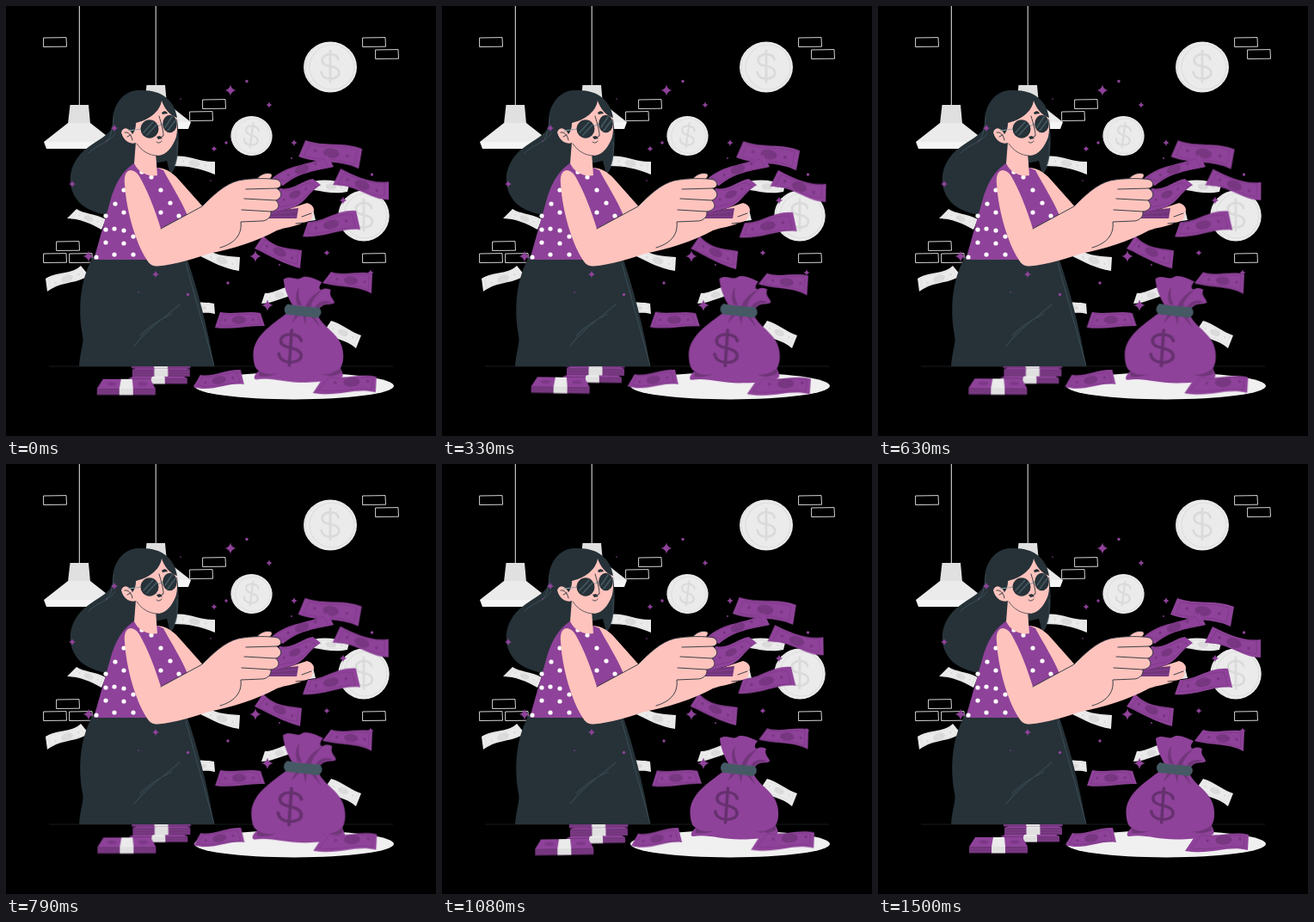
Write an HTML page that moves like this. It is 500 px wide and 500 px high and loops after 1.54 s.

```html
<!DOCTYPE html>
<html lang="en">
<head>
<meta charset="utf-8">
<title>Money shower</title>
<style>
  html, body { margin: 0; width: 100%; height: 100%; overflow: hidden; background: #000; }
  svg { display: block; width: 100vw; height: 100vh; }
  .line { fill: none; stroke-linecap: round; stroke-linejoin: round; }
  .ink { stroke: #263238; stroke-width: .9; }
  .dark { fill: #263238; }
  .skin { fill: #ffc3bd; }
  .plum { fill: #8e4299; }
  .deep { fill: #71357a; }
  .pale { fill: #ebebeb; }
  .grey { fill: #e0e0e0; }
  .wind { transform-origin: 276px 304px; animation: wind 1.54s linear infinite; }
  .beat { transform-origin: 340px 376px; animation: beat 1.54s linear infinite; }
  @keyframes wind {
    0% { transform: rotate(.08deg); }
    22.9% { transform: rotate(1deg); }
    72.6% { transform: rotate(-1deg); }
    97.4%, 100% { transform: rotate(0deg); }
  }
  @keyframes beat {
    0% { transform: scale(1.02); }
    8% { transform: scale(1.1); }
    27.8%, 37.8% { transform: scale(1); }
    47.7% { transform: scale(1.1); }
    57.7%, 100% { transform: scale(1); }
  }
</style>
</head>
<body>
<svg viewBox="0 0 500 500" xmlns="http://www.w3.org/2000/svg">
  <defs>
    <path id="dollar" class="line" d="M11 -9C10 -14 5 -16 0 -16C-6 -16 -11 -13 -11 -8C-11 -2 -5 -1 0 0C6 1 12 3 12 9C12 14 6 17 0 17C-6 17 -11 14 -12 8M0 -21V21"/>
    <g id="lamp">
      <path class="grey" d="M-10.500 0H11L13 22H-13Z"/>
      <path class="pale" d="M-13 21H13L41 43H-41Z"/>
      <path fill="#f5f5f5" d="M-41 43H41L38 51H-38Z"/>
    </g>
    <g id="coin">
      <ellipse class="pale" rx="31" ry="29.500"/>
      <ellipse class="line" cx="2" rx="26" ry="26" stroke="#dedede" stroke-width="1.200"/>
      <path class="line" d="M-15 -24C-34 -12 -34 12 -15 24" stroke="#dedede"/>
      <use href="#dollar" transform="translate(0 -1) scale(.86)" stroke="#dadada" stroke-width="3.200"/>
    </g>
  </defs>

  <g id="bricks" class="line" stroke="#ebebeb" stroke-width=".9"></g>
  <path d="M85.300 0V115M174.200 0V92" stroke="#ebebeb"/>
  <use href="#lamp" x="85" y="115"/>
  <use href="#lamp" x="174" y="92"/>
  <use href="#coin" x="377" y="71"/>
  <use href="#coin" transform="translate(285.500 151) rotate(8) scale(.78)"/>
  <use href="#coin" transform="translate(416 244) scale(.96 1)"/>
  <path d="M50 419H450" stroke="#1c2529" stroke-width=".8"/>
  <ellipse cx="335" cy="441.700" rx="116" ry="15.700" fill="#f0f0f0"/>
  <g id="paleNotes"></g>

  <g class="beat">
    <path class="plum" d="M334 350C328 340 324 330 323 319C330 314 337 320 342 318C348 313 358 318 367 322C363 327 363 330 366 331C372 328 374 330 377 331C374 339 381 341 381 346C375 349 370 345 364 352Z"/>
    <path class="deep" d="M339 348C336 340 337 333 341 328C339 337 341 342 344 349ZM348 350C352 340 359 335 367 331C359 339 355 344 354 351ZM359 350C365 343 372 342 378 346C371 346 366 347 363 352Z"/>
    <path class="plum" d="M329 356C308 372 288 384 288.500 406C289 416 291 421 295 423C288 429 289 433 292 433C310 430 325 437 349 436.500C372 436 388 433 390 430C392 427 389 424 388 420C393 412 392 397 386 388C377 375 368 372 362 360Z"/>
    <path class="deep" d="M295 423C303 428 309 428 316 426C308 430 301 430 295 429ZM388 420C380 426 372 428 366 427C374 431 382 429 388 426ZM337 359L332 369L341 360ZM345 360L348 371L349 361ZM354 361L365 374L358 361Z"/>
    <path fill="#455a64" d="M328 347C340 350 352 350 363 351C368 355 366 361 361 363C350 361 338 360 327 359C322 355 324 349 328 347Z"/>
    <use href="#dollar" transform="translate(331 397) rotate(4) scale(1.060 .96)" stroke="#66306f" stroke-width="3.300"/>
  </g>

  <g class="wind">
    <g id="packs"></g>
    <g id="plumNotes"></g>
  </g>

  <!-- hair and body -->
  <path class="dark" d="M156 98C135 97 123 118 124 136C125 151 100 157 85 174C69 194 73 218 88 231C101 241 119 245 132 243L150 188L187 180L191 196C202 180 202 155 199 132Z"/>
  <path class="line" d="M126 128C123 140 125 150 116 158M199 158C200 176 198 188 191 195M127 148C122 158 104 162 96 171" stroke="#455a64" stroke-width=".7"/>
  <path class="dark" d="M101 292H210C223 330 235 376 242 419H85C86 402 91 392 89 383C83 350 87 317 101 292Z"/>
  <path class="line" d="M209 299L242 418" stroke="#455a64" stroke-width=".7"/>
  <path class="line" d="M149 395C164 376 181 365 202 347M156 383C168 371 180 364 193 358" stroke="#37474f" stroke-width="1.200"/>
  <path class="skin" d="M176 188C186 189 193 193 201 202L233 238L210 250Z"/>
  <path class="plum" d="M150 182C138 190 129 201 122 224L102 295H214L212 246C204 226 192 208 183 191L173 187Z"/>
  <g id="dots" fill="#fff"></g>
  <path class="skin" d="M151 158L149 183C154 194 166 199 176 197L174 170Z"/>

  <!-- head -->
  <path class="skin" d="M149 128L178 108L197 122C200 140 200 151 195 159C190 169 183 175 173 174C163 173 155 168 151 159C143 162 135 154 134 147C134 141 143 140 148 146Z"/>
  <path class="line ink" d="M138 147C142 146 146 150 147 156M141 152L145 150"/>
  <path class="line" d="M152 160C158 169 167 174 176 174" stroke="#263238" stroke-width=".7"/>
  <path class="dark" d="M127 145C121 121 133 99 156 98C180 97 196 109 199 130C190 127 184 119 181 110C179 124 164 133 151 136C151 143 149 147 147 149C143 141 136 140 134 147C135 152 139 158 142 160C133 158 128 152 127 145Z"/>
  <path class="line" d="M142 145L158 143M176 140L183 137" stroke="#90a4ae" stroke-width="1.200"/>
  <path class="dark" d="M181 124C184 121 187 122 188 125L182 126Z"/>
  <ellipse class="dark" cx="167" cy="143" rx="10.500" ry="10.700"/>
  <ellipse class="dark" cx="190.500" cy="137" rx="8.300" ry="10.300"/>
  <path class="line" d="M160 147L171 135M164 150L175 138M185 141L193 129M188 145L197 133" stroke="#455a64" stroke-width="1.500"/>
  <path class="line ink" d="M178 128C181 138 183 145 183 151L179 153M175 158C177 160 180 159 181 157"/>
  <path class="dark" d="M175 152L179 151L182 154L177 155Z"/>

  <!-- arms and held money -->
  <path class="skin" d="M234 257L305 244L350 229C358 231 360 238 356 241C359 247 352 251 345 252C335 257 326 257 315 261C291 274 262 283 235 288Z"/>
  <path class="line ink" d="M355 241L344 245M345 252L337 253" stroke-width=".7"/>
  <path class="deep" d="M302 239L340 235L338 247H303Z"/>
  <path class="line" d="M304 242L338 239M304 245H338" stroke="#8e4299" stroke-width=".8"/>
  <g id="heldNotes"></g>
  <path class="skin" d="M291 203C294 196 303 193 308 195C312 199 302 204 296 206Z"/>
  <path class="line ink" d="M291 201C295 196 303 193 308 195"/>
  <path class="skin" d="M138 207C136 190 147 186 155 198C165 215 174 239 180 259L228 233C240 221 254 207 270 203C286 200 305 200 316 202C322 206 320 211 315 212C322 217 321 223 314 226C320 232 316 238 308 239C309 246 303 250 297 250L273 251C275 268 263 278 244 285C222 293 196 301 176 302.500C169 303 166 299 163 294C151 275 140 239 138 207Z"/>
  <path class="line ink" d="M180 259L228 233C240 221 254 207 270 203C286 200 305 200 316 202C322 206 320 211 315 212L279 213M315 212C322 217 321 223 314 226L277 224M314 226C320 232 316 238 308 239L274 237M308 239C309 246 303 250 297 250L273 251C275 268 263 277 249 281"/>

  <g id="sparkles" class="plum"></g>
</svg>
<script>
  const ns = "http://www.w3.org/2000/svg";
  const group = id => document.getElementById(id);

  function add(parent, tag, attrs) {
    const el = document.createElementNS(ns, tag);
    for (const key in attrs) el.setAttribute(key, attrs[key]);
    return parent.appendChild(el);
  }

  // A wavy banknote with an inset frame, a medallion and two spots.
  function note(parent, d, x, y, angle, size, fill, shade) {
    const g = add(parent, "g", {});
    add(g, "path", { d, fill });
    add(g, "path", {
      d, fill: "none", stroke: shade, "stroke-width": .7,
      transform: `translate(${x} ${y}) scale(.84 .74) translate(${-x} ${-y})`
    });
    const mark = add(g, "g", {
      fill: shade, transform: `translate(${x} ${y}) rotate(${angle}) scale(${size})`
    });
    add(mark, "ellipse", { rx: 9.5, ry: 5.5 });
    add(mark, "path", {
      d: "M2 -3C-4 -4 -3 0 0 0S3 4 -2 3", fill: "none", stroke: fill,
      "stroke-width": .5, opacity: .5
    });
    for (const cx of [-19, 19]) add(mark, "circle", { cx, r: 1.8 });
  }

  function notes(id, list, fill, shade) {
    for (const n of list) note(group(id), ...n, fill, shade);
  }

  notes("paleNotes", [
    ["M194 175C211 172 225 182 243 181V196C226 189 213 186 194 186Z", 219, 183, 11, .7],
    ["M82 236C91 242 103 241 116 248L111 260C99 253 85 247 71 247Z", 96, 247, 20, .6],
    ["M46 317C60 308 75 313 87 302L96 313C82 324 66 319 48 332Z", 71, 317, -20, .75],
    ["M226 278C241 290 255 291 272 292L271 308C252 305 241 298 224 290Z", 251, 296, 17, .7],
    ["M217 342C226 346 234 344 242 346L243 358C233 355 226 358 215 357Z", 229, 351, 3, .45],
    ["M357 204C371 201 385 203 399 208L397 216C383 219 370 216 358 214Z", 378, 210, 5, .65],
    ["M301 334C313 334 323 326 336 324L340 336C325 336 312 346 297 346Z", 318, 336, -16, .6],
    ["M378 366C390 369 402 380 413 383L407 398C395 387 382 389 370 378Z", 392, 380, 25, .65],
    ["M344 236L356 233L360 249L346 251Z", 352, 243, 0, .25]
  ], "#ebebeb", "#dadada");

  notes("plumNotes", [
    ["M348 156C369 164 392 157 414 166L410 189C388 178 363 184 340 175Z", 378, 171, 9, 1],
    ["M389 189C405 197 425 207 445 204V225C421 225 411 208 380 208Z", 414, 208, 20, .95],
    ["M351 251C371 251 385 236 407 238L412 260C392 257 370 270 345 268Z", 378, 254, -13, .95],
    ["M299 267C313 282 326 281 344 284L342 305C323 300 308 291 289 282Z", 318, 286, 25, .85],
    ["M378 309C394 314 410 307 426 311L425 334C406 324 391 328 368 322Z", 401, 319, 5, .85],
    ["M249 356C265 359 281 354 296 357L301 372C281 371 263 377 243 374Z", 271, 365, -1, .85],
    ["M226 429C241 432 256 422 273 423L277 440C258 437 239 450 218 443Z", 248, 435, -10, .85],
    ["M371 429C394 436 410 426 431 431L430 449C405 443 389 455 357 450Z", 402, 437, -3, 1]
  ], "#8e4299", "#773680");

  notes("heldNotes", [
    ["M318 212C335 215 345 202 357 201L366 208C350 218 348 230 332 235L306 241Z", 336, 219, -26, .75],
    ["M307 203C327 182 354 187 374 173L381 187C360 192 341 193 322 209Z", 344, 190, -22, .9]
  ], "#8e4299", "#773680");

  // A bundle of notes: left edge, top, width, height of top face, height of front.
  function pack(x, y, w, top, front) {
    const g = group("packs"), base = y + top;
    const mid = x + w * .5;
    add(g, "path", { class: "plum", d: `M${x + 7} ${y}H${x + w - 6}L${x + w} ${base}H${x}Z` });
    add(g, "rect", { class: "deep", x, y: base, width: w, height: front });
    add(g, "path", {
      d: `M${x} ${base + front * .35}h${w}M${x} ${base + front * .7}h${w}`,
      stroke: "#8e4299", "stroke-width": .5
    });
    if (top > 5) for (const cx of [x + w * .25, x + w * .78])
      add(g, "ellipse", { cx, cy: y + top / 2, rx: 6, ry: 2.2, fill: "#7d3987" });
    add(g, "path", { class: "pale", d: `M${mid - 6} ${y}h13l1 ${top}h-16Z` });
    add(g, "rect", { class: "grey", x: mid - 8, y: base, width: 16, height: front });
  }
  pack(143, 430, 68, 3, 6.5);
  pack(147, 420, 67, 3, 8);
  pack(146, 402.5, 68.5, 12, 7);
  pack(106, 434, 68, 11, 7.5);

  const bricks = [[44, 37], [415, 37], [430, 51], [229, 109], [214, 123],
    [59, 274], [44, 288], [74, 288], [415, 288]];
  for (const [x, y] of bricks)
    add(group("bricks"), "path", { d: `M${x} ${y}l26 -.4l.5 10.600l-26.500 .3Z` });

  const dots = [[137, 214], [127, 230], [116, 244], [137, 240], [126, 259], [116, 275],
    [137, 261], [116, 260], [137, 276], [105, 292], [126, 289], [148, 289], [148, 268],
    [169, 199], [180, 214], [191, 229], [180, 240], [201, 244], [158, 193]];
  for (const [cx, cy] of dots) add(group("dots"), "circle", { cx, cy, r: 2.6 });

  const stars = [[261, 98, 6.5], [306, 115, 3.5], [242, 166, 3.7], [335, 159, 4],
    [373, 287, 3.8], [290, 291, 6.8], [304, 348, 6.8], [96, 291, 6.5], [174, 312, 4.2],
    [126, 142, 4.5], [77, 207, 4.2], [424, 310, 3.8], [392, 226, 4.5]];
  for (const [x, y, r] of stars) {
    const k = r * .16;
    add(group("sparkles"), "path", {
      d: `M${x} ${y - r}Q${x + k} ${y - k} ${x + r} ${y}Q${x + k} ${y + k} ${x} ${y + r}` +
         `Q${x - k} ${y + k} ${x - r} ${y}Q${x - k} ${y - k} ${x} ${y - r}Z`
    });
  }
  const specks = [[280, 87.5, 1.7], [256, 159, 1.7], [425.5, 196, 1.7], [258, 322, 1.7],
    [211.5, 335.5, 1.7], [318, 301, .9], [332, 177, .9], [203, 108, .8], [238, 203, .8],
    [154, 333, .8], [117, 157, .8]];
  for (const [cx, cy, r] of specks) add(group("sparkles"), "circle", { cx, cy, r });
</script>
</body>
</html>
```
